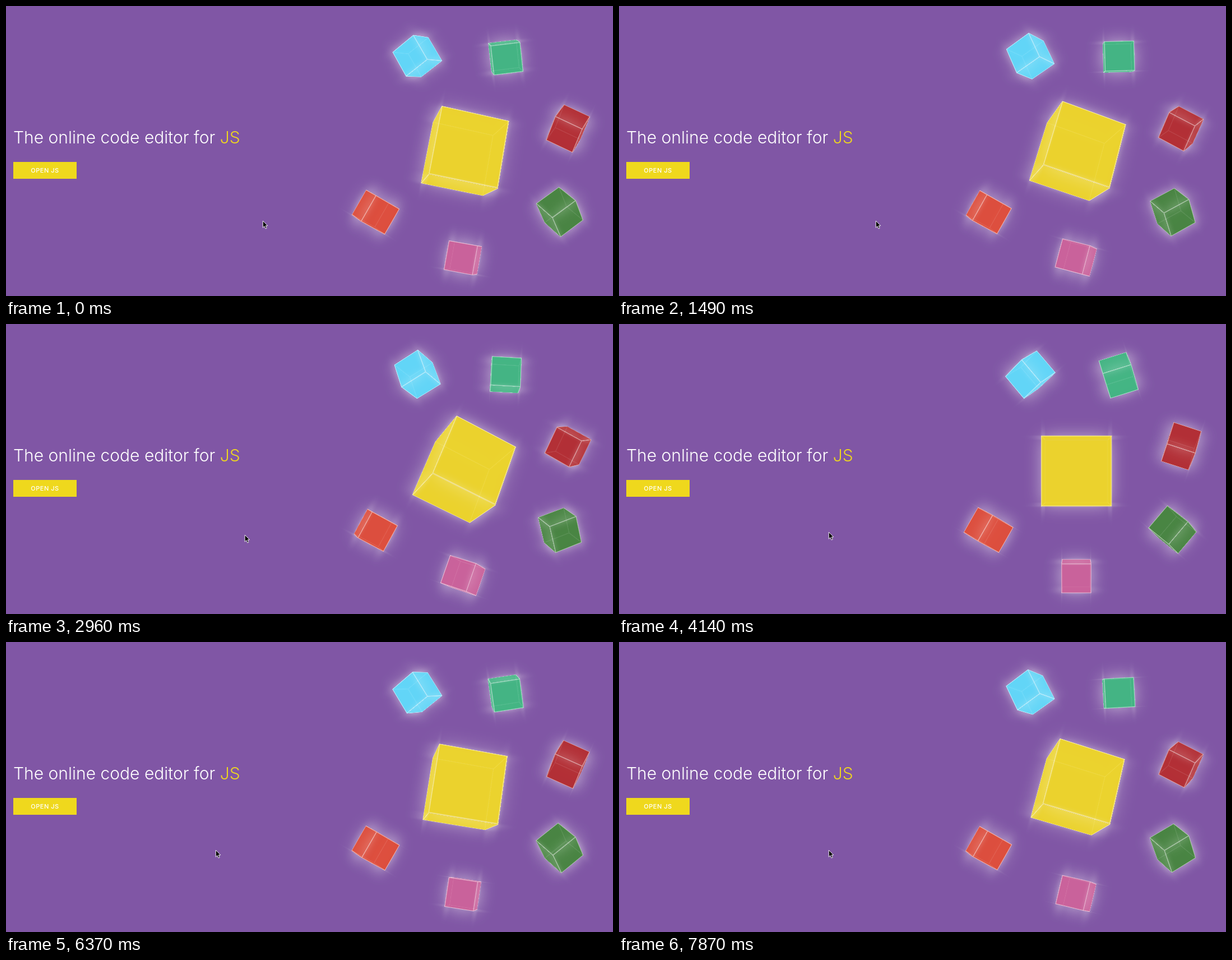
An HTML page for the animation above (8 s loop, 1083 by 517 pixels).

```html
<!DOCTYPE html>
<html lang="en">
<head>
<meta charset="utf-8">
<title>Online code editor</title>
<style>
  html, body { margin: 0; width: 100%; height: 100%; overflow: hidden; background: #8056a5; }
  body { position: relative; font-family: Inter, "Liberation Sans", sans-serif; color: #fff; }
  h1 {
    position: absolute; left: 13px; top: 219px; margin: 0;
    font-size: 30px; font-weight: 300; line-height: 30px; white-space: nowrap;
  }
  h1 span { color: #efd81d; }
  .button {
    position: absolute; left: 13px; top: 278px; width: 113px; height: 30px;
    background: #efd81d; font-size: 11px; font-weight: 500; line-height: 30px;
    letter-spacing: .5px; text-align: center;
  }
  .scene { position: absolute; width: 0; height: 0; perspective: 1000px; perspective-origin: 0 0; }
  .cube { position: absolute; width: 0; height: 0; transform-style: preserve-3d; }
  .face {
    position: absolute; box-sizing: border-box;
    border: 1px solid rgba(255, 255, 255, .5);
    box-shadow: 0 0 31px rgba(255, 255, 255, .32);
  }
  #cursor { position: absolute; left: 0; top: 0; overflow: visible; }
</style>
</head>
<body>
<h1>The online code editor for <span>JS</span></h1>
<div class="button">OPEN JS</div>
<svg id="cursor" width="12" height="18">
  <path d="M0 0V12.2L2.8 9.6L4.7 14L6.8 13.1L4.9 8.8H8.6Z" fill="#000" stroke="#fff" stroke-width=".9"/>
</svg>
<script>
const LOOP = 8000, STEP = LOOP / 54, RESET_STEP = 28, TURN_BEFORE = 2700;

// Angles are [x, y, z] in degrees, after the reset and 20.8 degrees of turning later.
const cubes = [
  { x: 816, y: 262.4, size: 118.7, rgb: '239,216,40', from: [0, 0, 0], to: [20.8, 20.8, 20.8] },
  { x: 733.6, y: 90.1, size: 52, rgb: '97,218,251', from: [-22.6, -31, 41.5], to: [30, -31.5, 72.5] },
  { x: 890.9, y: 90.5, size: 52, rgb: '65,184,131', from: [-26.5, 9, -15], to: [14.5, 3, 2.8] },
  { x: 1002.5, y: 217.5, size: 52, rgb: '181,46,49', from: [-49.5, -12.7, 13], to: [-2.5, -20.5, 27] },
  { x: 987.5, y: 366.9, size: 52, rgb: '71,134,63', from: [-50, 44, -26], to: [-20, 24, -12.4] },
  { x: 815.9, y: 449.2, size: 51.5, rgb: '204,98,154', from: [-10, 0, 0], to: [11, -20.8, 20.8] },
  { x: 659, y: 366.8, size: 52, rgb: '224,78,58', from: [-19.3, 30, 35], to: [-7, 9.2, 29] }
];
const sides = ['rotateY(0deg)', 'rotateY(90deg)', 'rotateY(180deg)', 'rotateY(270deg)',
  'rotateX(90deg)', 'rotateX(-90deg)'];
const cursor = document.getElementById('cursor');

function addDiv(parent, className, style) {
  const div = document.createElement('div');
  div.className = className;
  Object.assign(div.style, style);
  parent.append(div);
  return div;
}

for (const c of cubes) {
  const half = c.size / 2;
  const scene = addDiv(document.body, 'scene', { left: c.x + 'px', top: c.y + 'px' });
  c.node = addDiv(scene, 'cube', {});
  for (const side of sides) {
    addDiv(c.node, 'face', {
      left: -half + 'px', top: -half + 'px', width: c.size + 'px', height: c.size + 'px',
      background: `rgba(${c.rgb},.8)`,
      transform: `${side} translateZ(${half}px)`
    });
  }
}
document.body.append(cursor);

function turnAt(step) {
  const ms = step < RESET_STEP ? step * STEP + TURN_BEFORE : (step - RESET_STEP) * STEP;
  const s = ms / 1000;
  return (3.94 * s - .055 * s * s) / 20.8;
}

function draw(time) {
  const step = Math.min(53, Math.floor((time % LOOP + 20) / STEP));
  const turn = turnAt(step);
  for (const c of cubes) {
    const [x, y, z] = c.from.map((start, i) => start + (c.to[i] - start) * turn);
    c.node.style.transform = `rotateX(${x}deg) rotateY(${y}deg) rotateZ(${z}deg)`;
  }
  const p = Math.min(1, Math.max(0, (step * STEP - 2550) / 980));
  const ease = p * p * (3 - 2 * p);
  cursor.style.transform = `translate(${458.3 - 84 * ease}px,${383 - 12 * ease ** .56}px)`;
}

const start = performance.now();
function tick() {
  draw(performance.now() - start);
  requestAnimationFrame(tick);
}
tick();
</script>
</body>
</html>
```
